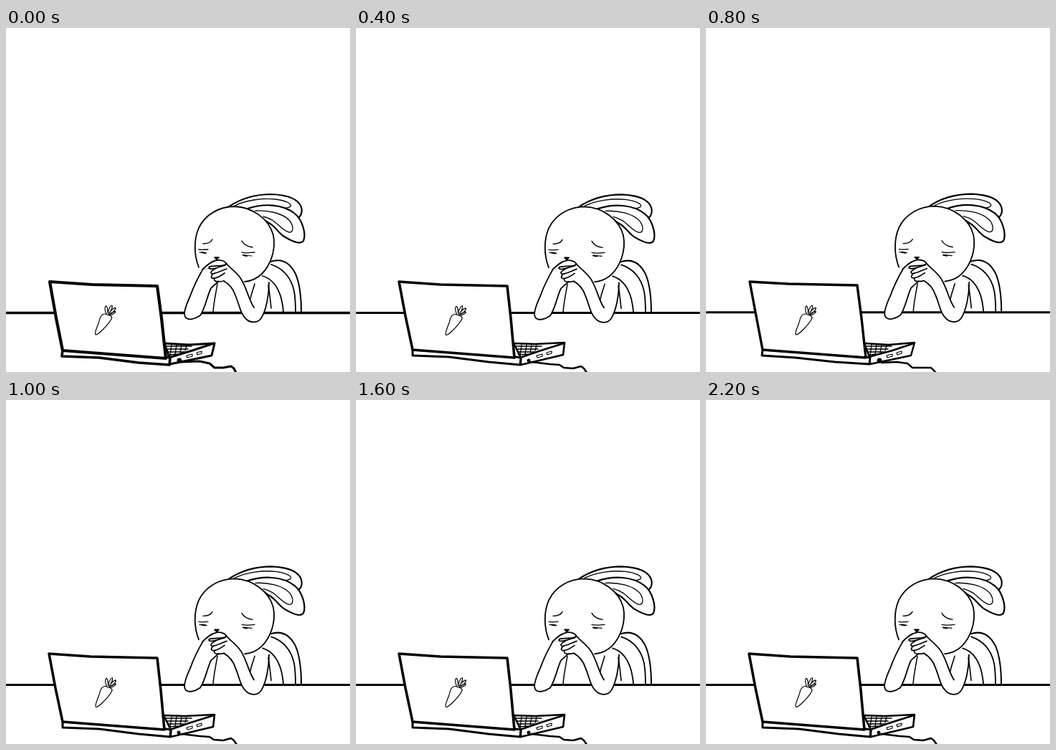
An HTML page with a canvas for the animation above (2400 ms loop, 480x480 px).

```html
<!DOCTYPE html>
<html lang="en">
<head>
<meta charset="utf-8">
<title>Tired bunny at a laptop</title>
<style>
html, body { margin: 0; width: 100%; height: 100%; overflow: hidden; background: #fff; }
canvas { display: block; width: 100vw; height: 100vh; }
</style>
</head>
<body>
<canvas id="stage" width="480" height="480"></canvas>
<script>
const ctx = document.getElementById('stage').getContext('2d');
const STEP = 200;

// Three hand-drawn versions alternate to make the line boil.
const poses = [
  {
    table: 397.5, tableW: 3.4, lidW: 4.2, baseW: 3, bunny: [0, 0],
    lid: 'M61 354L120 358L211 360L217 405L223 461L79 450L70 405Z',
    rim: 'M79 449L78 458L130 460L185 467L228 470L229 460',
    deck: 'M221 440L255 442L291 440L287 457L229 469L228 460Z',
    edge: 'M227 460L260 450L290 440',
    plug: [242, 464, 3.5],
    cable: 'M245 466L270 465L284 468L291 474L303 474L314 472L318 475L321 481',
    carrot: [0, 0]
  },
  {
    table: 396.7, tableW: 3, lidW: 3.4, baseW: 2.4, bunny: [0.2, -0.3],
    lid: 'M61 354L115 357L211 359L217 405L223 460L79 449L70 402Z',
    rim: 'M79 449L78 457L125 460L180 466L228 469L229 460',
    deck: 'M221 440L255 442L291 439L286 457L229 469L228 459Z',
    edge: 'M227 459L260 450L290 440',
    plug: [242, 464, 3.5],
    cable: 'M245 467L266 466L281 468L288 474L304 474L314 474L321 481',
    carrot: [0.5, 0]
  },
  {
    table: 397.5, tableW: 3.1, lidW: 3.6, baseW: 2.6, bunny: [0, 0.4],
    lid: 'M60 354L118 358L211 360L216 405L221 460L79 449L69 402Z',
    rim: 'M79 449L79 457L130 459L185 466L229 470L230 460',
    deck: 'M220 440L250 441L291 439L289 456L230 470L230 460Z',
    edge: 'M229 460L258 450L290 440',
    plug: [241, 464, 2.5],
    cable: 'M245 466L270 469L284 470L290 474L303 475L314 472L318 475L322 481',
    carrot: [0.5, 0.5]
  }
];

function ink(d, width = 1.8, fill = null) {
  const path = new Path2D(d);
  if (fill) {
    ctx.fillStyle = fill;
    ctx.fill(path);
  }
  ctx.lineWidth = width;
  ctx.stroke(path);
}

function shifted([x, y], draw) {
  ctx.save();
  ctx.translate(x, y);
  draw();
  ctx.restore();
}

function chair() {
  ink('M369 326C384 321 396 327 404 343C411 359 412 378 412 397', 2);
  ink('M370 330C386 335 398 348 402 367C404 378 404 388 404 397');
  ink('M358 346C372 350 380 363 384 377C386 386 387 391 387 397');
}

function ears() {
  ink('M310 250C327 238 347 232 371 232C394 233 408 239 412 250C414 257 411 262 409 264L366 262Z', 2.2, '#fff');
  ink('M319 248C335 240 359 237 376 239C390 241 400 245 397 249C393 252 386 251 378 253', 1.3);
  ink('M337 252C360 244 387 246 403 259C414 268 419 288 415 297C411 303 398 297 388 291C378 284 376 276 365 271Z', 2.2, '#fff');
  ink('M348 255C365 254 386 258 396 269C401 276 402 285 395 285C387 283 381 275 373 269C367 265 363 264 359 263', 1.3);
}

function head() {
  ink('M269 334C262 316 262 295 269 279C278 260 298 249 319 249C345 250 367 267 373 289C377 310 369 331 357 343C350 350 342 353 333 354', 1.8, '#fff');
  ink('M275 301C281 301 286 299 288 295M329 297C332 303 337 305 344 306', 1.4);
  ink('M269 309C273 310 277 309 282 309M329 313C336 315 341 313 347 313', 1.3);
  ink('M270 313L280 314M331 317L343 318', 1.2);
  ink('M273 313L278 314M331 317L336 318', 2);
  ink('M291 320L297 320L294 323Z', 1.6, '#000');
}

function arms() {
  ink('M275 336C268 348 262 360 257 374C251 387 247 398 250 403C254 409 264 406 271 401C278 391 281 373 286 363L296 354L303 331Z', 1.8, '#fff');
  ink('M295 357C293 369 290 382 289 396', 1.5);
  ink('M307 329C311 334 322 341 328 351C336 363 339 379 346 388L363 372C363 386 362 398 357 405C351 413 340 413 334 406C326 396 326 384 319 370C315 361 309 357 304 353L290 352L283 334Z', 0.01, '#fff');
  ink('M307 328C312 335 324 342 329 352C337 366 339 380 346 390');
  ink('M304 353C311 357 317 364 320 373C326 387 327 399 335 406C341 412 351 412 356 405C363 394 367 373 367 355');
  ink('M347 357C345 365 342 371 341 378M366 359C368 371 369 381 370 391', 1.6);
  ink('M274 337C279 332 285 326 294 324C300 323 307 326 307 329C306 333 292 331 284 333C281 336 286 337 293 335L306 331', 1.8, '#fff');
  ink('M293 335C286 339 284 342 288 343C295 342 302 338 308 336M289 343C285 347 286 350 291 349C297 348 302 344 305 342M291 349C289 354 295 355 304 353', 1.7);
}

function carrot() {
  ink('M132 403C134 399 138 398 141 400C145 401 149 402 147 406C144 412 139 417 135 421C131 425 128 428 125 428C123 425 127 418 129 412C131 408 130 406 132 403Z', 1.2);
  ink('M140 399C137 393 138 387 140 388C142 390 142 395 142 398C143 392 146 387 148 387C149 390 146 396 143 399C147 393 152 389 153 391C152 395 148 398 144 400C148 396 153 395 153 396C151 399 148 400 145 401', 1.2);
}

function laptop(p) {
  ink(p.deck, p.baseW, '#fff');
  ink(p.edge, p.baseW);
  ink('M223 444L259 444M225 448L254 448M226 452L249 452M227 456L240 455', 1.6);
  ink('M231 442L229 457M238 442L236 455M245 443L243 453M252 443L250 450', 1.4);
  ink('M252 457L260 455L260 458L253 460ZM266 453L273 451L273 454L267 456Z', 1.2);
  ink(p.rim + 'L223 459L79 449Z', p.lidW * 0.85, '#fff');
  ink(p.lid, p.lidW, '#fff');
  ctx.beginPath();
  ctx.arc(...p.plug, 0, Math.PI * 2);
  ctx.fillStyle = '#000';
  ctx.fill();
  ink(p.cable, p.baseW);
  shifted(p.carrot, carrot);
}

function draw(p) {
  ctx.fillStyle = '#fff';
  ctx.fillRect(0, 0, 480, 480);
  ctx.strokeStyle = '#000';
  ctx.lineCap = ctx.lineJoin = 'round';
  shifted(p.bunny, chair);
  ink(`M-4 ${p.table}H328M357 ${p.table}H484`, p.tableW);
  shifted(p.bunny, () => { ears(); head(); arms(); });
  laptop(p);
}

const start = performance.now();
function tick(now) {
  const t = Math.max(0, now - start) % 2400;
  draw(poses[Math.floor(t / STEP) % poses.length]);
  requestAnimationFrame(tick);
}
tick(start);
</script>
</body>
</html>
```
